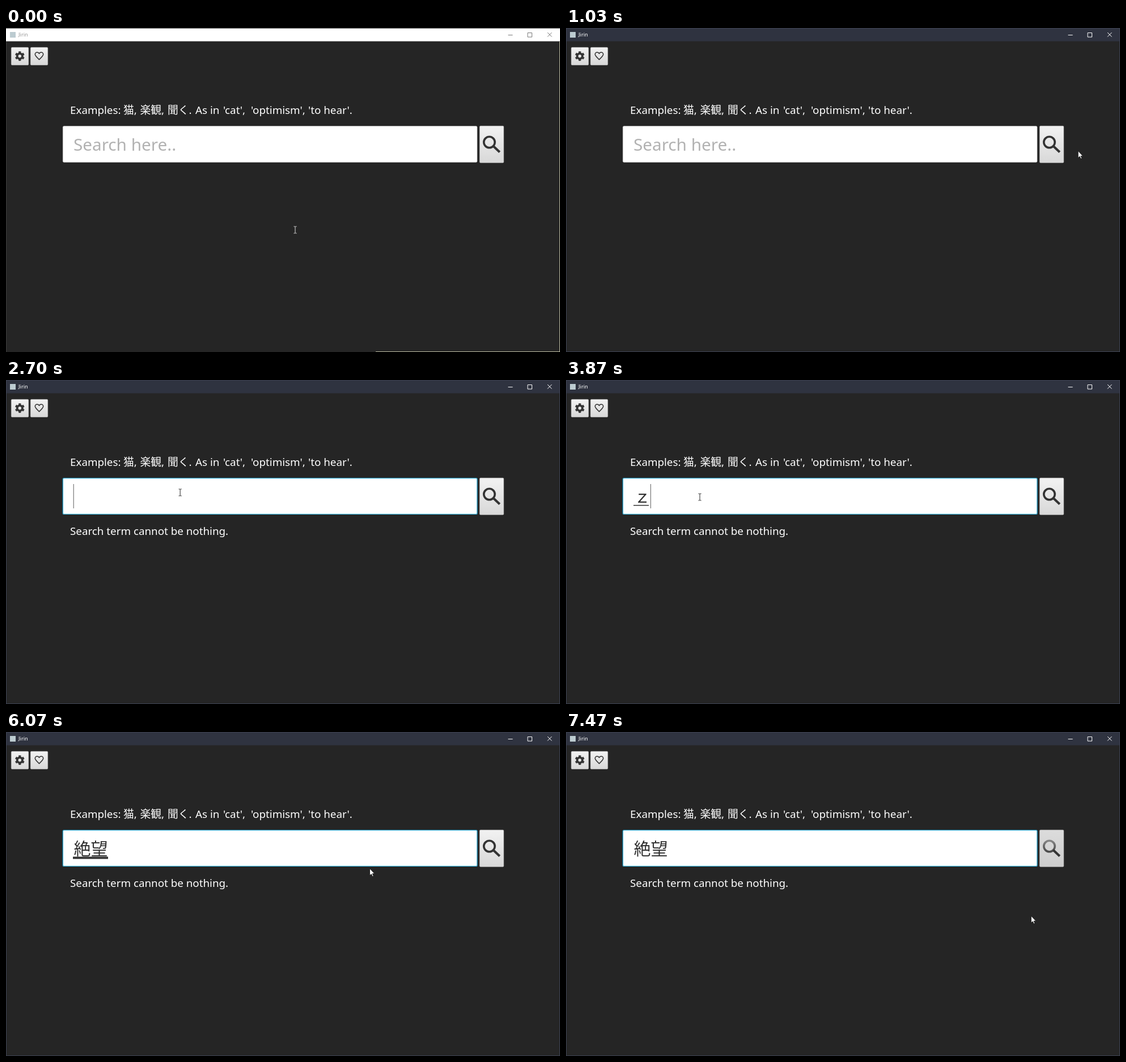
These frames come from a looping animation (977 by 573 pixels, 8 s). An HTML page:

```html
<!DOCTYPE html>
<html lang="ja">
<head>
<meta charset="utf-8">
<title>Jirin</title>
<style>
html, body { margin: 0; width: 100%; height: 100%; overflow: hidden; background: #252525; }
svg { display: block; width: 977px; height: 573px; }
text { font-family: "Noto Sans", "Noto Sans CJK JP", sans-serif; white-space: pre; }
.label { font-size: 18.8px; fill: #fff; }
.input { font-size: 30px; font-family: "Noto Sans CJK JP", "Noto Sans CJK", sans-serif; fill: #333; }
.icon { fill: none; stroke: #333; }
</style>
</head>
<body>
<svg viewBox="0 0 977 573">
  <defs>
    <linearGradient id="raised" x2="0" y2="1">
      <stop stop-color="#f2f2f2"/><stop offset="1" stop-color="#d8d8d8"/>
    </linearGradient>
    <linearGradient id="sunken" x2="0" y2="1">
      <stop stop-color="#dcdcdc"/><stop offset="1" stop-color="#cdcdcd"/>
    </linearGradient>
    <linearGradient id="faded" x2="0" y2="1">
      <stop stop-color="#858585"/><stop offset="1" stop-color="#4a4a4a"/>
    </linearGradient>
  </defs>
  <rect width="977" height="573" fill="#252525"/>

  <g id="inactive">
    <rect width="977" height="23.5" fill="#fff"/>
    <path d="M0 .5H977" stroke="#555"/>
    <path d="M.5 24V573" stroke="#3a3a3a"/>
    <path d="M976.5 24V573M652 572.5H977" stroke="#b9b9a0"/>
  </g>
  <g id="active">
    <rect width="977" height="23.5" fill="#2f3340"/>
    <rect x=".5" y=".5" width="976" height="572" fill="none" stroke="#3d4252"/>
  </g>
  <rect x="7" y="7" width="10" height="10" fill="#bccbd0"/>
  <text id="title" x="22" y="15" font-size="9.2">Jirin</text>
  <path id="controls" fill="none" d="M885.5 12.5h8M920 8.5h7.5v7.5h-7.5zM955 8l7.5 7.5m0-7.5l-7.5 7.5"/>

  <g fill="url(#raised)" stroke="#c4c4c4" stroke-width=".6">
    <rect x="9.3" y="34.3" width="30.4" height="31.2" rx="1.5"/>
    <rect x="43.3" y="34.3" width="30.4" height="31.2" rx="1.5"/>
    <rect id="searchButton" x="835.3" y="173.3" width="42.4" height="65" rx="1.5"/>
  </g>
  <g class="icon" transform="translate(24.3 49.7) rotate(-90)">
    <circle r="4.6" stroke-width="3.8"/>
    <circle r="7.1" stroke-width="2.7" pathLength="6" stroke-dasharray=".55 .45" stroke-dashoffset=".275"/>
  </g>
  <path class="icon" stroke-width="2" transform="translate(48.9 39.8) scale(.8)"
    d="M12 20C5.5 14.2 3 11.8 3 8.5C3 6 5 4 7.5 4C9.3 4 11 5 12 6.6C13 5 14.7 4 16.5 4C19 4 21 6 21 8.5C21 11.8 18.5 14.2 12 20Z"/>
  <g class="icon" stroke-width="3.6">
    <circle id="lens" cx="852.4" cy="202" r="9.7"/>
    <path d="M859.3 208.8L870.6 219.6" stroke-width="4.2"/>
  </g>

  <text class="label" y="152"><tspan x="113">Examples: </tspan><tspan x="207">猫, </tspan><tspan x="236.5">楽観, </tspan><tspan x="285">聞く. </tspan><tspan x="334">As in </tspan><tspan x="383">'cat', </tspan><tspan x="432">'optimism', </tspan><tspan x="533">'to hear'.</tspan></text>
  <text class="label" id="message" x="113" y="273.5">Search term cannot be nothing.</text>

  <rect id="field" x="100.3" y="173.6" width="730.6" height="63.8" rx="2" fill="#fff"/>
  <text id="prompt" x="119" y="216.5" font-size="29.7" fill="#b2b2b2">Search here..</text>
  <text id="typed" class="input" x="119.5" y="217"></text>
  <path id="underline" stroke="#333"/>
  <path id="caret" d="M0 184V227" stroke="#777" stroke-width="1.2"/>

  <path id="beam" fill="none" d="M-2.5 -6H-.5L0 -5.5L.5 -6H2.5M0 -5.5V5.5M-2.5 6H-.5L0 5.5L.5 6H2.5"/>
  <path id="arrow" fill="#fff" stroke="#111" stroke-width=".8" d="M.3 .3V12.6L3.1 10L5 14.2L6.9 13.4L5 9.3H8.7Z"/>
</svg>
<script>
const LOOP = 8000, ACTIVATE = 670, FOCUS = 2700, COMMIT = 6330, SEARCH = 7130;

// time, x, y of the pointer
const path = [
  [30, 510, 357], [130, 600, 418], [230, 790, 330], [330, 990, 186],
  [500, 985, 215], [760, 930, 228], [1030, 903, 217], [1200, 877, 236],
  [1800, 877, 236], [2000, 791, 231], [2280, 520, 208], [2530, 324, 197],
  [2630, 324, 197], [3000, 236, 207], [5600, 236, 207], [5850, 460, 228],
  [6100, 665, 243], [6330, 665, 243], [6600, 892, 205], [6770, 846, 186],
  [7130, 862, 194], [7170, 862, 194], [7470, 820, 325]
];
const typing = [
  [0, ''], [3870, 'ｚ'], [4100, 'ぜ'], [4300, 'ぜｔ'], [4500, 'ぜつ'],
  [4570, 'ぜつｂ'], [4800, 'ぜつぼ'], [5030, 'ぜつぼう'], [5100, '絶望']
];
// time, caret visible
const blink = [
  [0, 0], [FOCUS, 1], [3200, 0], [3670, 1], [5600, 0], [6100, 1], [COMMIT, 1], [6830, 0]
];

const $ = id => document.getElementById(id);
const set = (id, attrs) => {
  for (const key in attrs) $(id).setAttribute(key, attrs[key]);
};
const show = (id, on) => set(id, { visibility: on ? 'visible' : 'hidden' });
const latest = (steps, t) => steps.findLast(step => step[0] <= t)[1];

function pointerAt(t) {
  const next = path.findIndex(point => point[0] > t);
  if (next < 1) return (next ? path.at(-1) : path[0]).slice(1);
  const [t0, x0, y0] = path[next - 1], [t1, x1, y1] = path[next];
  const k = (t - t0) / (t1 - t0);
  return [x0 + (x1 - x0) * k, y0 + (y1 - y0) * k];
}

function drawWindow(t) {
  const active = t >= ACTIVATE;
  show('active', active);
  show('inactive', !active);
  set('title', { fill: active ? '#fff' : '#999' });
  set('controls', { stroke: active ? '#fff' : '#777' });
  show('message', t >= 1570);

  const searching = t >= SEARCH;
  const pressed = searching || (t >= 1500 && t < 1570);
  set('searchButton', { fill: `url(#${pressed ? 'sunken' : 'raised'})` });
  set('lens', { stroke: searching ? 'url(#faded)' : '#333' });
}

function drawField(t) {
  const focused = t >= FOCUS, text = latest(typing, t);
  const converted = t >= 5100, composing = text && t < COMMIT;
  set('field', { stroke: focused ? '#2fa4cc' : '#c8c8c8', 'stroke-width': focused ? 1.4 : .6 });
  show('prompt', !focused);
  $('typed').textContent = text;

  show('underline', composing);
  set('underline', converted
    ? { d: 'M118 222.4H180', 'stroke-width': 4 }
    : { d: `M119 221.7H${116 + 30 * text.length}`, 'stroke-width': 1.5 });

  const column = converted && composing ? 0 : text.length;
  show('caret', latest(blink, t));
  set('caret', { transform: `translate(${119.2 + 30.2 * column})` });
}

function drawPointer(t) {
  const [x, y] = pointerAt(t);
  const inField = x > 100 && x < 831 && y > 173 && y < 238;
  const beam = inField || t < 400;
  show('beam', beam);
  show('arrow', !beam);
  set('beam', { stroke: inField ? '#222' : '#ddd' });
  for (const id of ['beam', 'arrow']) set(id, { transform: `translate(${x} ${y})` });
}

const start = performance.now();
function draw() {
  const t = (performance.now() - start) % LOOP;
  drawWindow(t);
  drawField(t);
  drawPointer(t);
  requestAnimationFrame(draw);
}
draw();
</script>
</body>
</html>
```
